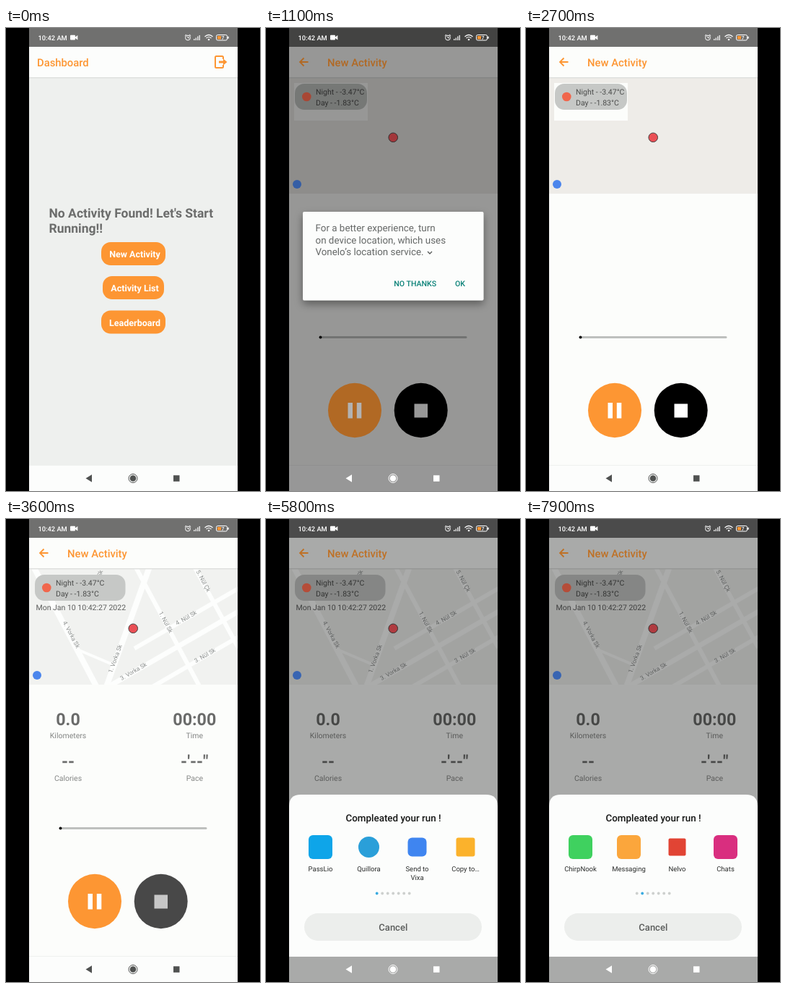
These frames come from a looping animation (352 by 640 pixels, 8 s). An HTML page:

```html
<!DOCTYPE html>
<html lang="en">
<head>
<meta charset="utf-8">
<title>Running app</title>
<style>
  html, body { margin: 0; width: 100%; height: 100%; overflow: hidden; background: #000; }
  svg { display: block; width: 100vw; height: 100vh; }
  text { font-family: Roboto, Arial, sans-serif; text-rendering: geometricPrecision; white-space: pre; }
  .mid { text-anchor: middle; }
  .med { font-weight: 500; }
  .bold { font-weight: 700; }
  .title { font-size: 14.8px; font-weight: 500; fill: #fd9633; }
  .small { font-size: 10.5px; }
  .app { font-size: 9.5px; fill: #2b2d2c; text-anchor: middle; }
  .street { font-size: 8.2px; fill: #8b8e8d; text-anchor: middle; }
  .num { font-size: 23.3px; font-weight: 700; fill: #6a6b6a; text-anchor: middle; }
  .unit { font-size: 10.5px; fill: #858786; text-anchor: middle; }
  .pill rect { fill: #fd9633; }
  .pill text { font-size: 12.5px; font-weight: 700; fill: #fff; text-anchor: middle; }
</style>
</head>
<body>
<svg viewBox="0 0 352 640">
  <defs>
    <clipPath id="phone"><rect x="32" width="289" height="640"/></clipPath>
    <clipPath id="mapArea"><rect x="32" y="69" width="289" height="160"/></clipPath>
    <clipPath id="aboveNav"><rect x="32" width="289" height="605"/></clipPath>
    <filter id="shadow" x="-20%" y="-20%" width="140%" height="150%">
      <feDropShadow dx="0" dy="5" stdDeviation="6" flood-opacity=".4"/>
    </filter>
  </defs>
  <rect width="352" height="640"/>
  <g clip-path="url(#phone)">
    <g id="home">
      <rect x="32" width="289" height="640" fill="#eef0ee"/>
      <rect x="32" y="26" width="289" height="42" fill="#fcfdfc"/>
      <rect x="32" y="68" width="289" height="1.5" fill="#dfe1df"/>
      <text class="title" x="43" y="53">Dashboard</text>
      <g fill="none" stroke="#fd9633" stroke-width="2">
        <path d="M301 43V40.5Q301 39 299.5 39H291.500Q290 39 290 40.500V53.500Q290 55 291.500 55H299.500Q301 55 301 53.500V51"/>
        <path d="M295 47H302" stroke-width="3"/>
      </g>
      <path d="M301 42.500L306.500 47L301 51.500Z" fill="#fd9633"/>
      <g class="bold" font-size="17.5" fill="#6c6d6c">
        <text x="59.500" y="262">No Activity Found! Let's Start</text>
        <text x="59.500" y="283">Running!!</text>
      </g>
      <g class="pill" id="newBtn"><rect x="132" y="296" width="89" height="32" rx="13"/><text x="178.500" y="317">New Activity</text></g>
      <g class="pill"><rect x="134" y="343" width="85" height="32" rx="13"/><text x="178.500" y="364">Activity List</text></g>
      <g class="pill"><rect x="132" y="390.500" width="89" height="32" rx="13"/><text x="178.500" y="412">Leaderboard</text></g>
    </g>

    <g id="run">
      <rect x="32" width="289" height="640" fill="#fcfdfb"/>
      <rect x="32" y="69" width="289" height="160" fill="#eeece8"/>
      <g id="map" clip-path="url(#mapArea)">
        <rect x="32" y="69" width="289" height="160" fill="#f1f2f0"/>
        <g id="roads" stroke="#fdfefd"></g>
        <g id="streets"></g>
      </g>
      <rect x="32" y="68" width="289" height="1.500" fill="#dfe1df"/>
      <rect id="card" x="39" y="76" width="102" height="52" fill="#fcfdfb"/>
      <rect id="chip" x="40" y="77" height="36" rx="13" fill="#c6c8c6"/>
      <g class="small" fill="#4c4d4c">
        <text x="69" y="92">Night - -3.47°C</text>
        <text x="69" y="107">Day - -1.83°C</text>
      </g>
      <g id="live">
        <text class="small" x="41.500" y="125.500" fill="#5c5d5c">Mon Jan 10 10:42:27 2022</text>
        <g id="stats"></g>
      </g>
      <path d="M75 427.500H277" stroke="#bec0be" stroke-width="3" stroke-linecap="round"/>
      <circle cx="75.500" cy="427.500" r="1.900"/>
      <ellipse id="stop" cx="214.700" cy="528.500" rx="37" ry="37.700"/>
      <rect id="stopIcon" x="205.500" y="519.500" width="18.500" height="19"/>
    </g>

    <rect x="32" width="289" height="26" fill="#70706f"/>
    <rect x="32" y="605" width="289" height="35" fill="#fcfdfc"/>
    <rect x="32" y="604" width="289" height="1" fill="#eff1ef"/>
    <rect id="dim" x="32" width="289" height="640"/>

    <g id="accents">
      <path d="M58.500 47H47.500M52.500 41.500L47 47L52.500 52.500" fill="none" stroke="#fd9633" stroke-width="1.800"/>
      <text class="title" x="85" y="53">New Activity</text>
      <circle cx="56.300" cy="95" r="6.300" fill="#f1664c"/>
      <circle cx="176.200" cy="151.300" r="6.300" fill="#ea4f55" stroke="#454545"/>
      <circle cx="43" cy="216" r="6" fill="#4c86ec"/>
      <ellipse cx="123" cy="528.500" rx="37" ry="37.700" fill="#fd9633"/>
      <path d="M113.500 518H120V539.500H113.500ZM125.800 518H132.300V539.500H125.800Z" fill="#fff"/>
    </g>

    <g id="dialog">
      <rect x="51" y="254" width="250.500" height="122.500" rx="2" fill="#fcfdfc" filter="url(#shadow)"/>
      <g font-size="13.4" fill="#646766">
        <text x="68.500" y="281">For a better experience, turn</text>
        <text x="68.500" y="297.500">on device location, which uses</text>
        <text x="68.500" y="314">Vonelo’s location service.</text>
      </g>
      <path d="M224 309L227 312L230 309" fill="none" stroke="#555857" stroke-width="1.300"/>
      <rect id="ripple" x="252" y="337" width="38" height="32" rx="9" fill="#e0e3e1"/>
      <g class="med" font-size="10.6" fill="#0b8278">
        <text x="177.300" y="357">NO THANKS</text>
        <text x="262" y="357">OK</text>
      </g>
    </g>

    <g clip-path="url(#aboveNav)">
      <g id="sheet">
        <path d="M32 640V397Q32 381 48 381H305Q321 381 321 397V640Z" fill="#fcfdfc"/>
        <text class="mid med" x="176.500" y="418" font-size="13.4" fill="#151615">Compleated your run !</text>
        <g id="blanks" fill="#f5f7f6"></g>
        <g id="pages"></g>
        <g id="dots"></g>
        <rect x="53" y="545" width="246" height="38" rx="19" fill="#eceeec"/>
        <text class="mid med" x="176.300" y="568.500" font-size="13" fill="#5b5d5c">Cancel</text>
      </g>
    </g>

    <g fill="#fff">
      <text class="med" x="44.500" y="16.500" font-size="9.3">10:42 AM</text>
      <rect x="89" y="9.800" width="7" height="6.800" rx="1"/>
      <path d="M96 12.500L99.300 10V16.500L96 14Z"/>
      <path d="M260 17V15H261.500V17ZM262.500 17V13.500H264V17ZM265 17V11.500H266.500V17ZM267.500 17V10H269V17Z" opacity=".8"/>
      <g fill="none" stroke="#fff">
        <circle cx="252" cy="13.500" r="3.400"/>
        <path d="M252 11.500V13.700H254M247.800 10.800L250 9M256.200 10.800L254 9"/>
        <path d="M275.500 12Q281 7 286.500 12M277.500 14Q281 11 284.500 14" stroke-width="1.200"/>
        <rect x="291.500" y="9.500" width="15" height="7.500" rx="2"/>
      </g>
      <circle cx="281" cy="16" r="1.300"/>
      <rect x="307.300" y="11.700" width="1.500" height="3"/>
      <rect x="293" y="11" width="5" height="4.500" fill="#fd9633"/>
      <text class="med" x="298.500" y="16" font-size="7">7</text>
    </g>
    <g id="nav">
      <path d="M110.500 622.500L119 617.300V627.700Z"/>
      <circle cx="176" cy="622.500" r="6" fill="none" stroke="currentColor"/>
      <circle cx="176" cy="622.500" r="4.300"/>
      <rect x="232" y="618.300" width="8.500" height="8.500"/>
    </g>
  </g>
</svg>
<script>
const LOOP = 8000;
const SLOTS = [75.5, 142.5, 209.5, 276.5];
const PAGE_WIDTH = 289;
const $ = id => document.getElementById(id);

function add(parent, tag, attrs, text = '') {
  const el = document.createElementNS('http://www.w3.org/2000/svg', tag);
  for (const name in attrs) el.setAttribute(name, attrs[name]);
  el.textContent = text;
  return parent.appendChild(el);
}

// Road: x1, y1, x2, y2, width
for (const [x1, y1, x2, y2, w] of [
  [35, 60, 125, 231, 8], [139, 232, 199, 66, 8], [138, 234, 322, 128, 7],
  [178, 179, 322, 96, 6], [196, 236, 322, 163, 6],
  [180, 67, 268, 231, 6], [261, 66, 322, 178, 6], [98, 180, 150, 202, 4]
]) add($('roads'), 'line', { x1, y1, x2, y2, 'stroke-width': w });

for (const [name, x, y, turn] of [
  ['4. Vorka Sk', 88, 161, 62], ['1. Vorka Sk', 154, 194, -70],
  ['3. Vorka Sk', 178, 213, -30], ['1. Nül Sk', 219, 144, 62],
  ['4. Nül Sk', 251, 139, -30], ['3. Nül Sk', 277, 191, -30],
  ['5. Nül Çk', 271, 87, 62], ['Sk', 133, 76, -70]
]) add($('streets'), 'text', { class: 'street', transform: `translate(${x} ${y}) rotate(${turn})` }, name);

for (const [value, unit, x, y] of [
  ['0.0', 'Kilometers', 86, 284.5], ['00:00', 'Time', 261.3, 284.5],
  ['--', 'Calories', 86, 343], ['-\'--"', 'Pace', 261.3, 343]
]) {
  add($('stats'), 'text', { class: 'num', x, y }, value);
  add($('stats'), 'text', { class: 'unit', x, y: y + 18.5 }, unit);
}

// App: label lines, colour, size, corner radius
const apps = [
  [['PassLio'], '#0ea5e9', 33, 6], [['Quillora'], '#2a9fd9', 29, 14.5],
  [['Send to', 'Vixa'], '#3f85f0', 26, 6], [['Copy to…'], '#fbb22c', 26, 3],
  [['ChirpNook'], '#3fd15f', 33, 6], [['Messaging'], '#fba63c', 33, 6],
  [['Nelvo'], '#e14434', 24, 2], [['Chats'], '#d92e7f', 33, 6]
].map(([lines, fill, size, rx], i) => {
  const x = SLOTS[i % 4] + Math.floor(i / 4) * PAGE_WIDTH;
  const g = add($('pages'), 'g', {});
  add(g, 'rect', { x: x - size / 2, y: 453.5 - size / 2, width: size, height: size, rx, fill });
  lines.forEach((line, n) => add(g, 'text', { class: 'app', x, y: 487 + n * 11.5 }, line));
  return g;
});
const blanks = SLOTS.map(cx => add($('blanks'), 'circle', { cx, cy: 453.5, r: 18 }));
const dots = Array.from({ length: 8 }, () => add($('dots'), 'circle', { cy: 517.5, r: 1.9 }));

const ramp = (t, from, to) => Math.min(1, Math.max(0, (t - from) / (to - from)));
const smooth = x => x * x * (3 - 2 * x);
const easeOut = x => 1 - (1 - x) ** 3;
const set = (id, name, value) => $(id).setAttribute(name, value);
const show = (id, on) => set(id, 'opacity', +on);

function draw(t) {
  // Dashboard to run screen
  const enter = smooth(ramp(t, 430, 730));
  const rise = `translate(0 ${(1 - enter) * 40})`;
  set('newBtn', 'opacity', 1 - 0.6 * (ramp(t, 220, 320) - ramp(t, 420, 500)));
  for (const id of ['run', 'accents']) {
    show(id, enter);
    set(id, 'transform', rise);
  }

  // Location dialog and the shade behind the overlays
  const leave = ramp(t, 2500, 2680);
  const dim = 0.6 * (ramp(t, 900, 1200) - leave) + 0.33 * ramp(t, 4100, 4550);
  show('dialog', ramp(t, 930, 1080) - leave);
  show('ripple', ramp(t, 2250, 2380));
  show('dim', dim);
  $('accents').style.filter = `brightness(${1 - 0.75 * dim})`;
  $('nav').style.color = dim > 0.1 ? '#fff' : '#505251';
  set('nav', 'fill', 'currentColor');

  // Run data arrives
  const loaded = t >= 2900;
  show('map', ramp(t, 2750, 3000));
  show('live', loaded);
  show('card', !loaded);
  set('chip', 'width', loaded ? 125.5 : 100);
  const pressed = ramp(t, 3420, 3560) - ramp(t, 3750, 3900);
  const shade = 72 * pressed, icon = 255 - 56 * pressed;
  set('stop', 'fill', `rgb(${shade},${shade},${shade})`);
  set('stopIcon', 'fill', `rgb(${icon},${icon},${icon})`);

  // Share sheet
  set('sheet', 'transform', `translate(0 ${230 * (1 - easeOut(ramp(t, 3980, 4350)))})`);
  apps.forEach((app, i) => {
    const shown = ramp(t, 4700 + (i % 4) * 90, 4800 + (i % 4) * 90);
    app.setAttribute('opacity', shown);
    if (i < 4) blanks[i].setAttribute('opacity', 1 - shown);
  });
  set('pages', 'transform', `translate(${-PAGE_WIDTH * smooth(ramp(t, 6050, 6550))} 0)`);
  const ready = t >= 4700, page = t >= 6450 ? 1 : 0;
  dots.forEach((dot, i) => {
    dot.setAttribute('cx', (ready ? 153.7 : 150) + 7.5 * i);
    dot.setAttribute('fill', i === page ? '#3aabe0' : '#cdd0ce');
    dot.setAttribute('opacity', ready && i === 7 ? 0 : 1);
  });
}

const start = performance.now();
function tick() {
  draw((performance.now() - start) % LOOP);
  requestAnimationFrame(tick);
}
tick();
</script>
</body>
</html>
```
